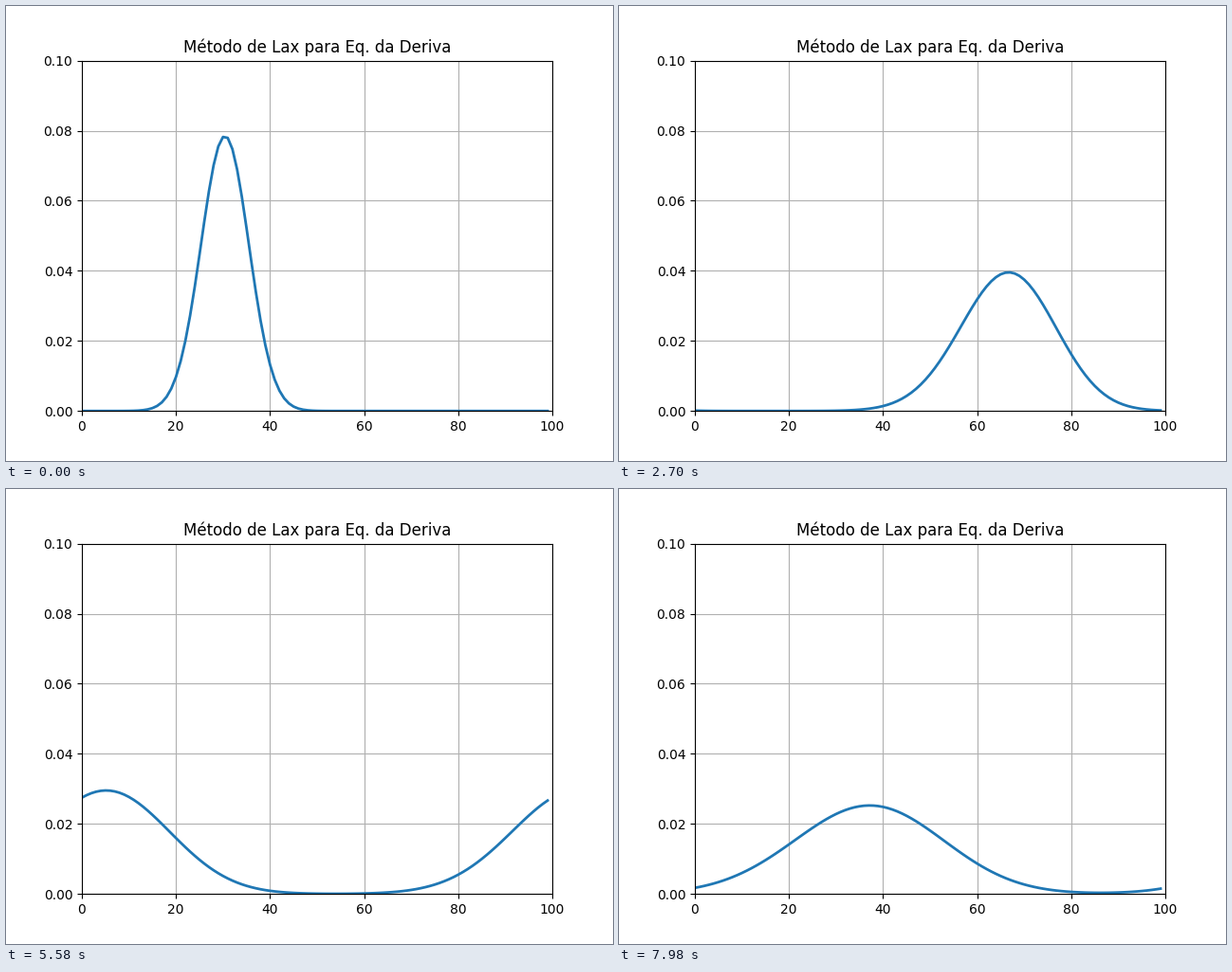
Animation of 640x480 px, one loop 8000 ms. Source, as a matplotlib script:

```python
import numpy as np
import matplotlib.pyplot as plt
from matplotlib.animation import FuncAnimation

LOOP_MS = 8000
FRAMES = 267
N = 100          # grid points, periodic domain
COURANT = 0.4
MEAN, SIGMA = 30, 5


def lax_step(u):
    """One Lax step of the drift equation with periodic ends."""
    right, left = np.roll(u, -1), np.roll(u, 1)
    return 0.5 * (right + left) - 0.5 * COURANT * (right - left)


x = np.arange(N)
u = np.exp(-0.5 * ((x - MEAN) / SIGMA) ** 2) / (SIGMA * np.sqrt(2 * np.pi))
states = []
for _ in range(FRAMES):
    u = lax_step(u)
    states.append(u)

fig, ax = plt.subplots(figsize=(6.4, 4.8), dpi=100)
ax.set_xlim(0, 100)
ax.set_ylim(0, 0.1)
ax.set_title("Método de Lax para Eq. da Deriva")
ax.grid()
line, = ax.plot(x, states[0], lw=2)


def draw(i):
    line.set_ydata(states[i])
    return line,


anim = FuncAnimation(fig, draw, frames=FRAMES, interval=LOOP_MS / FRAMES,
                     repeat=True, repeat_delay=0)
plt.show()
```
